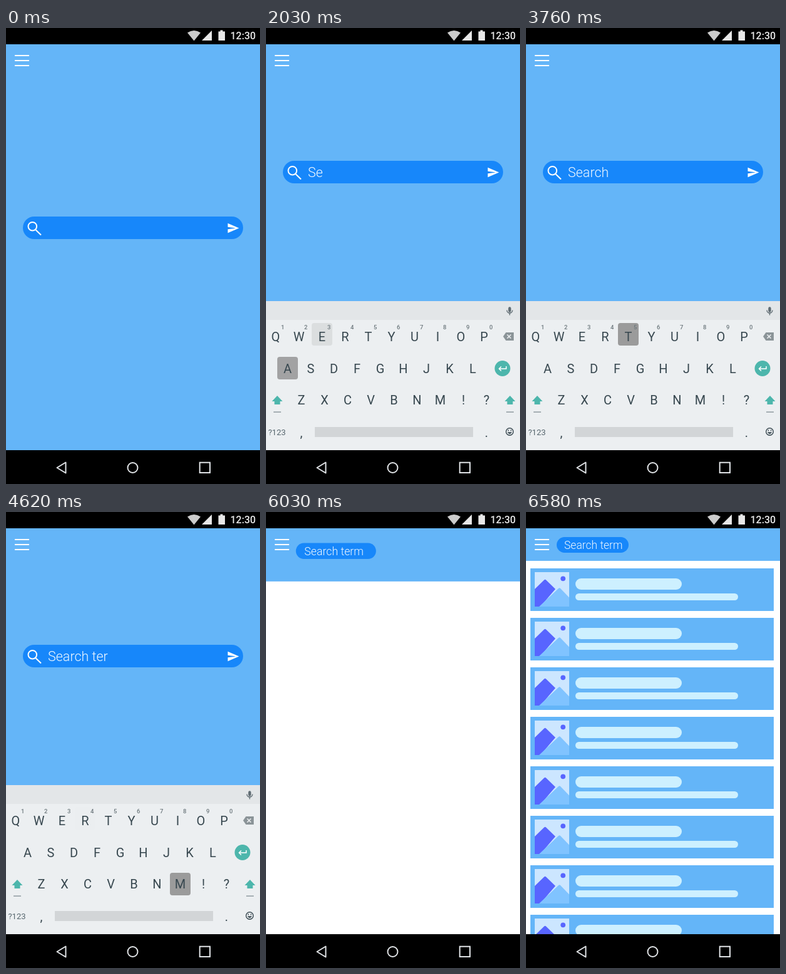
These frames come from a looping animation (406x728 px, 7.74 s). An HTML page:

```html
<!DOCTYPE html>
<html lang="en">
<head>
<meta charset="utf-8">
<title>Search flow</title>
<style>
  html, body { margin: 0; width: 100%; height: 100%; overflow: hidden; background: #000; }
  svg { display: block; width: 100%; height: 100%; }
  text { font-family: Roboto, "Open Sans", sans-serif; white-space: pre; }
</style>
</head>
<body>
<svg id="stage" viewBox="0 0 406 728">
  <rect y="26" width="406" height="648" fill="#fff"/>
  <g id="list"></g>
  <rect id="header" y="26" width="406" fill="#64b5f8"/>
  <path d="M14 44h23M14 52h23M14 60h23" stroke="#fff" stroke-width="2"/>

  <rect id="bar" fill="#1787fa"/>
  <g id="icons">
    <g fill="none" stroke="#fff" stroke-width="2">
      <circle cx="42.3" cy="-2.3" r="6.8"/>
      <path d="M47 2.7l9 8.8"/>
    </g>
    <path transform="translate(352.8 -9.8) scale(.857)" d="M2 21l21-9L2 3v7l15 2-15 2z" fill="#fff"/>
  </g>
  <text id="query" fill="#eef7ff" font-weight="300"></text>

  <g id="keyboard">
    <rect y="436" width="406" height="238" fill="#eceff1"/>
    <rect y="436" width="406" height="30" fill="#e3e6e8"/>
    <g fill="none" stroke="#5f6b72" stroke-width="1.4">
      <rect x="388" y="446" width="3" height="7" rx="1.5" fill="#5f6b72"/>
      <path d="M385 450.5a4.5 4.5 0 0 0 9 0M389.5 455v3.5"/>
    </g>
    <path d="M379 492.5l4.5-6.5h12.5v13h-12.5z" fill="#8b9498"/>
    <path d="M385.5 489.5l6 6m0-6l-6 6" stroke="#eceff1" stroke-width="1.6"/>
    <circle cx="378" cy="543.5" r="12.5" fill="#4db6ac"/>
    <path d="M384 540v4h-11.5m3.5-3.5l-3.5 3.5 3.5 3.5" fill="none" stroke="#fff" stroke-width="1.5"/>
    <g id="shifts"></g>
    <rect x="78" y="637" width="253" height="16" fill="#d2d5d7"/>
    <g fill="none" stroke="#37474f" stroke-width="1.4">
      <circle cx="389.5" cy="644.5" r="5.8"/>
      <path d="M386.3 645.5q3.2 4.6 6.4 0z" fill="#37474f" stroke-width=".6"/>
      <path d="M387.4 641.6v2m4.2-2v2"/>
    </g>
    <g id="keys"></g>
  </g>

  <circle id="tap"/>

  <rect width="406" height="26" fill="#000"/>
  <path d="M290 7.5q10.5-7 21 0L300.5 20.5z" fill="#ccc"/>
  <path d="M329 4v16h-16z" fill="#e8e8e8"/>
  <path d="M339.5 5.5h3v-2h4v2h3.500v14.500h-10.500z" fill="#e8e8e8"/>
  <text x="358.500" y="18.300" font-size="16" font-weight="500" fill="#e8e8e8">12:30</text>

  <rect y="674" width="406" height="54" fill="#000"/>
  <g fill="none" stroke="#e0e3e6" stroke-width="2">
    <path d="M95.500 693.500v17l-14-8.500z" stroke-linejoin="round"/>
    <circle cx="202.500" cy="702" r="8"/>
    <rect x="309.700" y="693.700" width="16.300" height="16.300"/>
  </g>
</svg>
<script>
const LOOP = 7740;
const TERM = 'Search term';
const PRESS = [1294, 1631, 1968, 2305, 2641, 2978, 3291, 3604, 3917, 4229, 4542];
const RELEASE = 4860, TYPE_DELAY = 200;
const BAR_FROM = [27, 212, 352, 36], BAR_TO = [49, 40, 115, 25];

const $ = id => document.getElementById(id);
const clamp = v => Math.min(1, Math.max(0, v));
const span = (t, a, b) => clamp((t - a) / (b - a));
const mix = (a, b, p) => a + (b - a) * p;
const inOut = u => u < .5 ? 4 * u ** 3 : 1 - 4 * (1 - u) ** 3;
const out = u => 1 - (1 - u) ** 3;

function set(el, attrs) {
  for (const k in attrs) el.setAttribute(k, attrs[k]);
  return el;
}
function add(parent, tag, attrs, text = '') {
  const el = set(document.createElementNS('http://www.w3.org/2000/svg', tag), attrs);
  el.textContent = text;
  return parent.appendChild(el);
}
function label(parent, s, x, cy, size, fill = '#37474f', weight = 400) {
  return add(parent, 'text', {
    x, y: cy + .355 * size, 'font-size': size, fill,
    'font-weight': weight, 'text-anchor': 'middle'
  }, s);
}

// Keyboard
const keys = $('keys'), caps = {};
function cap(name, x, y, width, height, rx) {
  caps[name] = add(keys, 'rect', { x, y, width, height, rx, fill: '#9b9b9b', opacity: 0 });
}
cap(' ', 78, 637, 253, 16, 0);
[['QWERTYUIOP', 15.5, 493, 471], ['ASDFGHJKL', 34.5, 544, 525], ['ZXCVBNM!?', 56.5, 594, 576]]
  .forEach(([row, x0, cy, top], r) => [...row].forEach((ch, i) => {
    const x = x0 + 37 * i;
    cap(ch, x - 16.5, top, 33, 36, 4);
    label(keys, ch, x, cy, 20);
    if (!r) label(keys, (i + 1) % 10, x + 11.3, 477.5, 9.5, '#6d787d', 500);
  }));
label(keys, '?123', 17.5, 645, 13, '#56666e');
label(keys, ',', 56.5, 645.5, 20);
label(keys, '.', 352.5, 645.5, 20);
for (const x of [18, 390]) {
  add($('shifts'), 'path', { d: `M${x} 587l8.500 9h-4v5h-9v-5h-4z`, fill: '#4db6ac' });
  add($('shifts'), 'rect', { x: x - 6, y: 612.5, width: 12, height: 1.2, fill: '#78858b' });
}

// Result cards
for (let i = 0; i < 8; i++) {
  const g = add($('list'), 'g', { transform: `translate(0 ${90 + 79 * i})` });
  const box = (x, y, width, height, fill, rx = 0) => add(g, 'rect', { x, y, width, height, fill, rx });
  box(7, 0, 389, 68, '#64b5f8');
  box(14, 6, 55, 55, '#cce6ff');
  add(g, 'circle', { cx: 59.2, cy: 16.3, r: 3.9, fill: '#5865ff' });
  add(g, 'path', { d: 'M14 33l15-14.500q1.500-1.500 3 0L47 33 23 61h-9z', fill: '#5865ff' });
  add(g, 'path', { d: 'M21 61l31-29q1.500-1.500 3 0l14 14.500V61z', fill: '#80c3ff' });
  box(79, 16, 170, 18, '#cdf0ff', 9);
  box(79, 40, 260, 11, '#cdf0ff', 5.5);
}

function drawKeys(t) {
  const alpha = {};
  PRESS.forEach((start, i) => {
    const end = PRESS[i + 1] ?? RELEASE;
    const a = span(t, start, start + 70) * (1 - span(t, end, end + 80));
    const ch = TERM[i].toUpperCase();
    alpha[ch] = Math.max(alpha[ch] || 0, a);
  });
  for (const ch in alpha) set(caps[ch], { opacity: alpha[ch] });
}

function drawTap(t) {
  const second = t > 3000;
  const u = span(t, second ? 5080 : 300, second ? 5720 : 940);
  set($('tap'), {
    cx: second ? 360.5 : 203, cy: second ? 231 : 319,
    r: 30.5 - 18 * u * u,
    opacity: .28 * clamp(u / .4) * clamp((1 - u) / .3)
  });
}

function draw(t) {
  const open = inOut(span(t, 600, 990));
  const close = inOut(span(t, 5317, 5710));
  const fold = inOut(span(t, 5790, 6107));
  const [x, y, width, height] = BAR_FROM.map((v, i) => mix(v, BAR_TO[i], fold));
  const top = y + 89 * (1 - open);
  const mid = top + height / 2;
  const size = mix(21.5, 17.5, fold);

  set($('bar'), { x, y: top, width, height, rx: height / 2 });
  set($('icons'), { transform: `translate(0 ${mid})`, opacity: 1 - clamp(fold / .4) });
  set($('query'), { x: mix(67, 61, fold), y: mid + .355 * size, 'font-size': size });
  $('query').textContent = TERM.slice(0, PRESS.filter(p => t >= p + TYPE_DELAY).length);

  set($('header'), { height: mix(648, 52, fold) });
  set($('keyboard'), { transform: `translate(0 ${238 * (1 - open + close)})` });
  set($('list'), { transform: `translate(0 ${590 * (1 - out(span(t, 6090, 6560)))})` });
  drawKeys(t);
  drawTap(t);
}

const begin = performance.now();
function tick() {
  draw((performance.now() - begin) % LOOP);
  requestAnimationFrame(tick);
}
tick();
</script>
</body>
</html>
```
